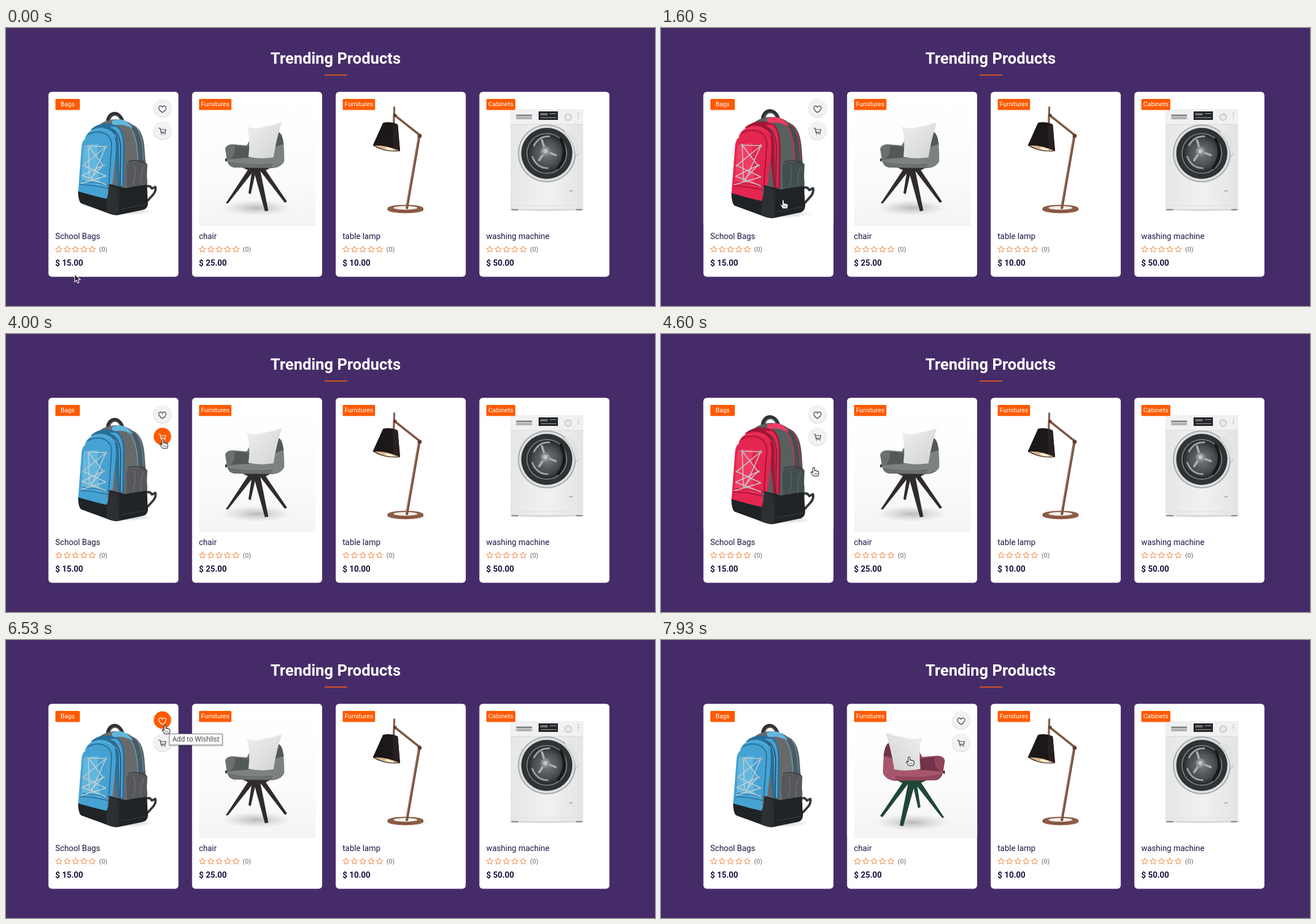
Animation of 1143 by 490 pixels, one loop 8 s. Source, as an HTML page:

```html
<!DOCTYPE html>
<html lang="en">
<head>
<meta charset="utf-8">
<title>Trending Products</title>
<style>
  html, body { margin: 0; width: 100%; height: 100%; overflow: hidden; background: #452c69; }
  svg { display: block; width: 1143px; height: 490px; font-family: Roboto, Arial, sans-serif; }
  .heading { font-weight: 700; font-size: 27.6px; fill: #fff; text-anchor: middle; }
  .tag { font-size: 11.2px; fill: #fff; text-anchor: middle; }
  .name { font-size: 14.3px; fill: #1c1745; }
  .count { font-size: 11.6px; fill: #666; }
  .price { font-size: 14.4px; font-weight: 700; fill: #171540; }
  .tip { font: 11.9px "Open Sans", "Noto Sans", sans-serif; fill: #383838; }
  .line { fill: none; stroke-linecap: round; stroke-linejoin: round; }
</style>
</head>
<body>
<svg id="stage" viewBox="0 0 1143 490"></svg>
<script>
const LOOP = 8000;
const ORANGE = '#ff5a00';
const PITCH = 253;

const products = [
  { tag: 'Bags', tagWidth: 43, name: 'School Bags', price: '$ 15.00' },
  { tag: 'Furnitures', tagWidth: 57, name: 'chair', price: '$ 25.00' },
  { tag: 'Furnitures', tagWidth: 57, name: 'table lamp', price: '$ 10.00' },
  { tag: 'Cabinets', tagWidth: 51, name: 'washing machine', price: '$ 50.00' }
];

const line = (d, color, width = 1) =>
  `<path class="line" d="${d}" stroke="${color}" stroke-width="${width}"/>`;
const shape = (d, fill) => `<path d="${d}" fill="${fill}"/>`;
const oval = (x, y, rx, ry, fill, extra = '') =>
  `<ellipse cx="${x}" cy="${y}" rx="${rx}" ry="${ry}" fill="${fill}" ${extra}/>`;
const box = (x, y, w, h, fill, r = 0, extra = '') =>
  `<rect x="${x}" y="${y}" width="${w}" height="${h}" rx="${r}" fill="${fill}" ${extra}/>`;
const label = (kind, x, y, text) => `<text class="${kind}" x="${x}" y="${y}">${text}</text>`;

function star(cx, cy) {
  const points = Array.from({ length: 10 }, (_, i) => {
    const a = (i / 5 - 0.5) * Math.PI, r = i % 2 ? 2.7 : 6;
    return `${(cx + r * Math.cos(a)).toFixed(2)},${(cy + r * Math.sin(a)).toFixed(2)}`;
  });
  return `<polygon points="${points.join(' ')}" fill="none" stroke="#f0863a" stroke-linejoin="round"/>`;
}

function bag({ main, dark, light, grey, shade }) {
  return oval(212, 323, 52, 7, 'url(#floor)') +
    line('M247 280Q253 276 257 283L263 280Q265 288 257 296L247 307', '#33373a', 4) +
    line('M179 168C178 150 197 143 205 163', '#303336', 6) +
    line('M183 164C185 153 195 150 201 161', '#66696b', 1.5) +
    shape('M160 176C170 160 203 155 222 170C240 177 244 197 245 226L249 270L248 300L178 302L166 210Z', grey) +
    shape('M220 171C239 178 243 200 244 228L246 275L236 280L232 215Q231 184 215 170Z', shade) +
    shape('M186 164Q205 156 218 170L224 176L215 174Q204 168 188 172Z', light) +
    line('M218 174Q230 190 232 227L233 273', main, 1.6) +
    line('M230 175Q241 193 242 231', main, 1.3) +
    shape('M149 179Q169 161 197 173Q208 180 209 211L208 279L197 280L190 204Q180 184 149 179Z', dark) +
    shape('M194 174Q206 181 206 209L205 278L200 278L199 207Q198 184 183 174Z', main) +
    line('M188 179Q201 186 202 211L201 278', '#2e3439', 1.4) +
    shape('M139 194C145 177 167 170 183 181Q196 187 193 222L188 274L178 278L172 206Z', main) +
    line('M144 188C162 178 186 184 186 207L181 276', dark, 2) +
    line('M155 181Q178 174 193 191', light, 1.3) +
    shape('M133 211Q134 194 146 193L168 194Q181 195 181 211L179 285L180 302L127 290Z', main) +
    shape('M137 207L163 204Q158 238 167 278L133 269Z', light) +
    shape('M212 243Q217 233 240 237L249 240L247 284L213 280Z', shade) +
    line('M215 236Q228 230 247 239', '#36393b', 1.6) +
    line('M225 241Q230 254 224 276M242 245Q235 260 239 280', grey, 2) +
    shape('M127 288L156 296L177 301Q181 295 182 275L210 282L248 276L250 310Q249 320 239 321L196 330Q187 330 176 325L132 309Q127 304 127 288Z', '#202326') +
    shape('M183 277L196 281L197 329Q187 329 177 324L177 302Q182 293 183 277Z', '#2d3033') +
    line('M198 283L198 328M203 319L246 311', '#3d4143', 1) +
    line('M131 276L156 278L180 283M136 270L179 276', dark, 1.5) +
    line('M145 208L176 209L136 242L176 261L132 274M145 208L171 242L134 260L176 276M145 208L147 267L171 242M176 209L150 267', '#c9d0d1', 1.5) +
    [[145, 208], [176, 209], [136, 242], [172, 242], [148, 267]]
      .map(([x, y]) => oval(x, y, 2.3, 2.3, '#aab1b2')).join('');
}

function chair({ cloth, dark, light, leg }) {
  return oval(441, 317, 62, 14, 'url(#floor)') +
    shape('M434 247L441 248L431 293L427 291Z', leg) +
    shape('M428 247L440 247L391 309L387 309Z', leg) +
    shape('M444 247L455 247L495 306L491 308Z', leg) +
    shape('M435 247L447 247L462 322L456 323Z', leg) +
    shape('M414 245L469 245L453 253L432 253Z', leg) +
    shape('M424 207L433 191L479 183Q487 185 489 206L490 234Q486 245 470 247L401 246Q391 244 389 232L386 213Q388 205 399 205Z', cloth) +
    shape('M403 207L428 210L428 232L392 233Q405 226 403 207Z', dark) +
    shape('M479 183Q487 185 489 206L466 217L472 190Z', dark) +
    shape('M466 220Q468 209 489 205L490 234Q487 243 469 246Z', light) +
    shape('M391 232Q427 226 468 230L469 241Q429 246 392 238Z', light) +
    line('M392 237Q427 244 469 240', dark) +
    shape('M424 173Q437 180 455 174Q475 171 486 166Q477 191 471 228Q449 232 427 227Q431 196 424 173Z', 'url(#pillow)') +
    line('M425 174Q437 180 455 174T485 167', '#f3f3f3') +
    box(386, 230, 3, 5, '#33363a');
}

function lamp() {
  const copper = '#75503e', glow = '#a67a62';
  return oval(707, 323, 38, 5, 'url(#floor)') +
    shape('M672 317.5A32 6 0 0 1 735 317.5V321A32 6.5 0 0 1 672 321Z', '#694434') +
    oval(703.5, 317.5, 31.5, 6, '#8b5e47') + oval(703.5, 317, 21, 3.3, '#f4eeea') +
    line('M674 321Q703 330 733 321', '#a66345', 1.5) +
    line('M683.8 140L682.8 169', copper, 3.4) + line('M683 140L682 168', glow, 1) +
    line('M685 154L729 189', copper, 4) + line('M685 152.5L729 187.5', glow, 1) +
    line('M728 190L706 317', copper, 4.5) + line('M727 191L705 316', glow, 1.2) +
    oval(728.5, 190, 3.6, 3.6, '#5e3d30') + oval(685, 154, 3, 3, '#5e3d30') +
    shape('M664 167Q678 164 690 170L694 217Q667 220 646 207Z', '#1c1718') +
    shape('M681 168L690 170L694 217L682 217Z', '#2a2020') +
    shape('M649 207Q669 206 692 216Q669 219 649 207Z', '#d9b48a') +
    oval(675, 213, 8, 2, '#fff0cf', 'transform="rotate(11 675 213)"');
}

function washer() {
  const cx = 952.5, cy = 221;
  return oval(953, 320, 66, 2.5, '#d9d9d9') +
    box(890, 317, 12, 4.5, '#8c8e90', 1) + box(1004, 317, 11, 4.5, '#8c8e90', 1) +
    box(888.5, 143, 128, 176, 'url(#metal)', 1) + box(888.5, 143, 128, 27, '#f1f1f1', 1) +
    line('M889 170H1016', '#d6d6d6') + line('M889 313H1016', '#dedede') +
    box(898, 152, 29, 9, '#c6c8c9', 1) + box(899, 153, 27, 2, '#77797b') + box(900, 157, 25, 4, '#aeb0b2') +
    box(938, 147, 34, 15, '#202226') + box(941, 150, 13, 4, '#70767b') +
    line('M942 158H969M958 151H969', '#888d92', 1.3) +
    oval(990, 157, 6.5, 6.5, '#c4c6c7') + oval(990, 157, 4.5, 4.5, '#ececec') +
    [150, 154, 158].map(y => oval(1008, y, 1, 1, '#aaa')).join('') +
    oval(cx, cy, 51, 51, '#a5a8aa') + oval(cx, cy, 49, 49, '#dcdedf') +
    oval(cx, cy, 45, 45, '#303335') + oval(cx, cy, 36, 36, '#777a7b') +
    oval(cx, cy, 34, 34, 'url(#glass)') +
    line('M930 207Q939 190 957 191M927 227Q935 247 954 247', '#a0a3a3', 3) +
    line('M950 217L944 198M950 217L968 224M950 217L939 233', '#a9acad', 4) +
    oval(950, 217, 8, 8, '#898d8e') + oval(950, 217, 4, 4, '#c0c3c3') +
    line('M977 196Q991 221 973 246', '#17191a', 5) +
    shape('M982 183Q999 180 1005 196L1009 221L1003 227Q1002 202 982 183Z', '#e1e3e3') +
    line('M982 183Q1002 202 1003 227L1009 221', '#a9acac') +
    box(992, 286, 6, 2, '#aeb0b1');
}

const heartPath = 'M0 6C-9 .5-7-5.5-3.5-5.7C-1.5-5.7 0-4.2 0-2.9C0-4.2 1.5-5.7 3.5-5.7C7-5.5 9 .5 0 6Z';
const cartPath = 'M-6.5-6H-4.2L-2 3H5.5M-3.7-3.5H6.2L4.8 1H-2.6M-1.7 5.2h.4M4.2 5.2h.4';

function button(y, glyph, id) {
  const face = (fill, ink, r) => oval(275.5, y, r, r, fill) +
    `<g transform="translate(275.5 ${y + 2})">${line(glyph, ink, 1.2)}</g>`;
  return oval(275.5, y + .8, 16.3, 16.3, '#ddd') + face('#f1f2f3', '#38414e', 15.7) +
    (id ? `<g id="${id}" opacity="0">${face(ORANGE, '#fff', 15.2)}</g>` : '');
}

function card(p, i) {
  const x = 75 + i * PITCH;
  const stars = [0, 1, 2, 3, 4].map(n => star(x + 18 + n * 14.7, 390.2)).join('');
  return label('name', x + 11.7, 372, p.name) + stars +
    label('count', x + 89, 394.2, '(0)') + label('price', x + 11.8, 419, p.price);
}

const tag = (p, i) => box(87 + i * PITCH, 125, p.tagWidth, 19.5, ORANGE, 1.5) +
  label('tag', 87 + i * PITCH + p.tagWidth / 2, 138, p.tag);

const blueBag = bag({ main: '#46a2d3', dark: '#286f9b', light: '#62b7df', grey: '#69696b', shade: '#55575a' });
const redBag = bag({ main: '#e52650', dark: '#a31637', light: '#f23b62', grey: '#56605f', shade: '#434e4e' });
const greyChair = chair({ cloth: '#6b6f70', dark: '#535859', light: '#7c8181', leg: '#302c2d' });
const redChair = chair({ cloth: '#914459', dark: '#70334a', light: '#a7566c', leg: '#1f4637' });
const photo = x => box(x, 113, 229, 236, '#fff', 6);

document.getElementById('stage').innerHTML = `
  <defs>
    <radialGradient id="floor"><stop stop-color="#888" stop-opacity=".55"/><stop offset="1" stop-color="#aaa" stop-opacity="0"/></radialGradient>
    <radialGradient id="glass"><stop stop-color="#777c7d"/><stop offset=".7" stop-color="#464b4d"/><stop offset="1" stop-color="#232729"/></radialGradient>
    <linearGradient id="metal"><stop stop-color="#e5e6e6"/><stop offset=".5" stop-color="#f1f1f1"/><stop offset="1" stop-color="#e3e4e4"/></linearGradient>
    <linearGradient id="pillow" x2="1" y2="1"><stop stop-color="#efefef"/><stop offset="1" stop-color="#d1d2d2"/></linearGradient>
    <linearGradient id="studio" x2="0" y2="1"><stop stop-color="#fff"/><stop offset=".6" stop-color="#fbfbfb"/><stop offset="1" stop-color="#f4f4f4"/></linearGradient>
  </defs>
  <rect width="1143" height="490" fill="#452c69"/>
  ${label('heading', 580.5, 62.7, 'Trending Products')}
  ${box(561, 82, 40, 1.8, '#ed571a')}
  ${products.map((p, i) => box(74.7 + i * PITCH, 112.5, 229, 326, '#fff', 6)).join('')}
  ${blueBag}
  <g id="bagHover" opacity="0">${photo(74.7)}<g transform="matrix(1.056 0 0 1.056 -10.1 -13.2)">${redBag}</g></g>
  ${box(340, 125, 205, 224, 'url(#studio)')}${greyChair}
  <g id="chairHover" opacity="0">${photo(327.7)}${box(340, 125, 216, 224, 'url(#studio)')}
    <g transform="matrix(-1.047 0 0 1.051 904.1 -11.4)">${redChair}</g></g>
  ${lamp()}${washer()}
  ${products.map(card).join('')}${products.map(tag).join('')}
  <g id="bagButtons">${button(141, heartPath, 'heartHover')}${button(180.5, cartPath, 'cartHover')}</g>
  <g id="chairButtons" opacity="0" transform="translate(${PITCH} 0)">${button(141, heartPath)}${button(180.5, cartPath)}</g>
  <g id="tooltip" opacity="0">
    ${box(289, 167, 94, 21, '#000', 1, 'opacity=".12"')}
    ${box(287.5, 165.5, 93.5, 19.5, '#fafafa', 0, 'stroke="#777"')}
    ${label('tip', 293.2, 179.2, 'Add to Wishlist')}
  </g>
  <g id="arrow"><path d="M0 0V13.5L3.2 10.7L5.3 15.5L7.7 14.4L5.7 9.8H10Z" fill="#222" stroke="#fff" stroke-width="1.1"/></g>
  <g id="hand"><path d="M-1.5 1.5Q-1.5 0 0 0T1.5 1.5V6Q3.5 4.8 4 6.5Q5.8 5.5 6.4 7.1Q8.8 6.4 8.7 9V12L7.3 15.5H-.6L-4.8 9.3Q-5.3 7.7-3.6 7.7L-1.5 9.3Z" fill="#fff" stroke="#222" stroke-width="1.1" stroke-linejoin="round"/><path class="line" d="M1.3 10.3V13M3.6 10.3V13M5.8 10.3V13" stroke="#444" stroke-width=".8"/></g>`;

// Each row is a time in ms followed by one value per channel.
const path = [
  [0, 121, 434], [70, 121, 434], [280, 123, 445], [870, 176, 382], [1250, 207, 325], [1600, 215, 303],
  [2600, 215, 303], [3400, 287, 265], [3780, 279, 188], [4050, 276, 186], [4400, 269, 228], [4600, 269, 235],
  [4750, 269, 233], [5130, 277, 194], [5470, 275, 185], [5620, 275, 183], [5900, 280, 150],
  [6730, 280, 150], [7200, 350, 178], [7530, 398, 214], [7670, 398, 214], [7830, 441, 197], [7930, 437, 206], [8000, 437, 206]
];
const fades = {
  bagHover: [[1000, 0], [1320, 1], [3650, 1], [3950, 0], [4150, 0], [4450, 1], [5020, 1], [5350, 0]],
  cartHover: [[3680, 0], [3900, 1], [4120, 1], [4320, 0], [5080, 0], [5350, 1], [5700, 1], [5920, 0]],
  heartHover: [[5850, 0], [6130, 1], [6830, 1], [7050, 0]],
  bagButtons: [[6980, 1], [7230, 0]],
  chairButtons: [[7080, 0], [7380, 1]],
  chairHover: [[7080, 0], [7420, 1]]
};
const parts = Object.fromEntries([...Object.keys(fades), 'tooltip', 'arrow', 'hand']
  .map(id => [id, document.getElementById(id)]));

function sample(rows, t) {
  const next = rows.findIndex(row => row[0] > t);
  if (next === 0) return rows[0].slice(1);
  if (next < 0) return rows[rows.length - 1].slice(1);
  const a = rows[next - 1], b = rows[next];
  const u = (t - a[0]) / (b[0] - a[0]), eased = u * u * (3 - 2 * u);
  return a.slice(1).map((v, i) => v + (b[i + 1] - v) * eased);
}

function draw(t) {
  for (const id in fades) parts[id].setAttribute('opacity', sample(fades[id], t)[0]);
  const [x, y] = sample(path, t);
  const onPhoto = y < 349 && !(x > 303.5 && x < 328);
  for (const id of ['arrow', 'hand']) {
    parts[id].setAttribute('transform', `translate(${x.toFixed(1)} ${y.toFixed(1)})`);
    parts[id].setAttribute('opacity', (id === 'hand') === onPhoto ? 1 : 0);
  }
  parts.tooltip.setAttribute('opacity', t >= 6530 && t < 6800 ? 1 : 0);
}

const start = performance.now();
function tick() {
  draw((performance.now() - start) % LOOP);
  requestAnimationFrame(tick);
}
tick();
</script>
</body>
</html>
```
